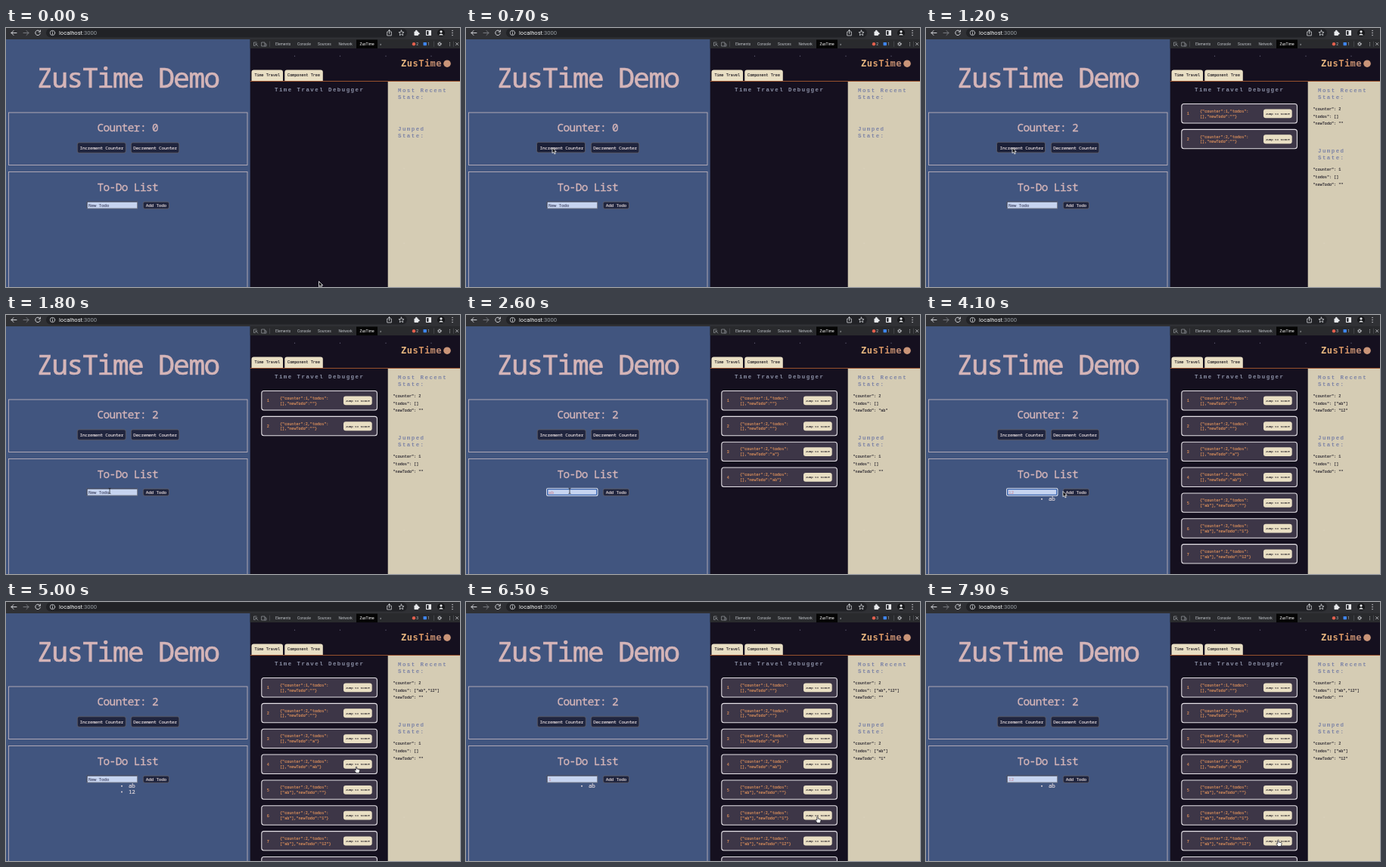
Recreate the animation shown at these times as an HTML page. Size 600x343 px, loop 8 s.

```html
<!DOCTYPE html>
<html lang="en">
<head>
<meta charset="utf-8">
<title>ZusTime Demo</title>
<style>
html, body { margin: 0; width: 100%; height: 100%; overflow: hidden; background: #41557f; }
svg { display: block; width: 100%; height: 100%; }
text { white-space: pre; fill: currentColor; stroke: currentColor; stroke-width: .02em; }
.page { font-family: "Noto Sans Mono", "DejaVu Sans Mono", monospace; letter-spacing: -.04em; color: #d5b5b8; }
.small { font-size: 6.05px; }
.label { color: #e6dcde; }
.ui { font-family: Roboto, Inter, sans-serif; font-size: 4.9px; color: #bdc1c6; stroke: none; }
.code { font-family: "Liberation Mono", "DejaVu Sans Mono", monospace; font-size: 5.12px; }
.head { font-size: 7.4px; font-weight: bold; letter-spacing: 1.48px; color: #7d84a6; stroke: none; }
.light { color: #8b90a6; }
.brand {
  font: bold 12px "DejaVu Sans Mono", monospace; letter-spacing: .5px;
  fill: url(#brand); stroke: none;
}
</style>
</head>
<body>
<svg id="stage" viewBox="0 0 600 343">
  <defs>
    <linearGradient id="brand">
      <stop offset="0" stop-color="#ecbf86"/>
      <stop offset=".5" stop-color="#d3905f"/>
      <stop offset="1" stop-color="#b98a78"/>
    </linearGradient>
  </defs>
</svg>
<script>
const LOOP = 8000;
const stage = document.getElementById("stage");

function add(tag, attrs, parent = stage) {
  const el = document.createElementNS("http://www.w3.org/2000/svg", tag);
  for (const k in attrs) el.setAttribute(k, attrs[k]);
  parent.appendChild(el);
  return el;
}
const rect = (x, y, width, height, fill, more = {}, parent) =>
  add("rect", { x, y, width, height, fill, ...more }, parent);
const dot = (cx, cy, r, fill, parent) => add("circle", { cx, cy, r, fill }, parent);
const line = { fill: "none", stroke: "#d0d2d6", "stroke-width": 1, "stroke-linecap": "round", "stroke-linejoin": "round" };
const icon = (d, more = {}) => add("path", { d, ...line, ...more });
const ringIcon = (cx, cy, r, more) => add("circle", { cx, cy, r, ...line, ...more });
function text(str, x, y, cls, more = {}, parent) {
  const el = add("text", { x, y, class: cls, ...more }, parent);
  el.textContent = str;
  return el;
}
const show = (el, on) => el.setAttribute("display", on ? "inline" : "none");
const middle = { "text-anchor": "middle" };

// Browser toolbar
function drawToolbar() {
  const thin = { "stroke-width": 0.8 };
  rect(0, 0, 600, 15, "#303135");
  rect(53, 0.5, 477, 12, "#212226", { rx: 6 });
  icon("M14 6.5H7M10 3.5L7 6.5L10 9.5");
  icon("M23 6.5H30M27 3.5L30 6.5L27 9.5", { stroke: "#77797e" });
  icon("M44.6 4.2A3.3 3.3 0 1 0 45.3 7.2M45.4 3V5.2H43.2");
  icon("M61.5 6V8.5M61.5 4.4V4.5", thin);
  ringIcon(61.5, 6.5, 3.2, thin);
  text("localhost", 70, 9.3, "ui", { style: "font-size:7.6px;color:#f1f3f4" })
    .insertAdjacentHTML("beforeend", '<tspan color="#9aa0a6">:3000</tspan>');
  icon("M505 5H503.7V10H509.3V5H508M506.5 7.5V2.5M505 4L506.5 2.5L508 4", thin);
  icon("M522.5 3L523.5 5.4L526 5.6L524.1 7.2L524.7 9.8L522.5 8.4L520.3 9.8L520.9 7.2L519 5.6L521.5 5.4Z", thin);
  rect(539.5, 4.5, 5.5, 5.5, "#e8eaed", { rx: 0.8 });
  dot(542.3, 4, 1.3, "#e8eaed");
  dot(545.3, 7.2, 1.3, "#e8eaed");
  rect(555.5, 3.5, 6, 6, "none", { stroke: "#e8eaed" });
  rect(558.5, 3.5, 3, 6, "#e8eaed");
  dot(575, 6.5, 5, "#17181b");
  dot(575, 4.8, 1.6, "#e8eaed");
  add("path", { d: "M572 9.6Q575 5.2 578 9.6Z", fill: "#e8eaed" });
  [3.5, 6.5, 9.5].forEach(y => dot(590, y, 0.75, "#d0d2d6"));
}

// Demo page on the left
function button(x, y, w, h, label) {
  const box = rect(x, y, w, h, "#20253e", { rx: 2.3, stroke: "#62616a", "stroke-width": 0.8 });
  text(label, x + w / 2, y + h / 2 + 2.1, "page small label", middle);
  return { box, x, y, w, h };
}

rect(0, 15, 323, 328, "#41557f");
text("ZusTime Demo", 161, 78.5, "page", { "font-size": 35.9, ...middle });
const frameStyle = { stroke: "#c2b5be", "stroke-width": 0.85 };
rect(3.5, 112, 315.5, 69.5, "none", frameStyle);
rect(3.5, 190.5, 315.5, 160, "none", frameStyle);
const counter = text("", 160.8, 137.3, "page", { "font-size": 14.4, ...middle });
text("To-Do List", 160.8, 216, "page", { "font-size": 14.4, ...middle });
const buttons = [
  button(94.3, 151.8, 64, 13.6, "Increment Counter"),
  button(165.3, 151.8, 63.5, 13.6, "Decrement Counter"),
  button(181.3, 230.2, 34.2, 9.2, "Add Todo")
];
rect(107, 230, 66.6, 9, "#c6d4f0", { stroke: "#777b88", "stroke-width": 0.9 });
add("path", { d: "M107 239V230H173.6", fill: "none", stroke: "#333a52", "stroke-width": 1 });
const ring = add("g", {});
rect(106.7, 229.7, 67.2, 9.6, "none", { rx: 1.2, stroke: "#f2f5ff", "stroke-width": 1.1 }, ring);
rect(107.8, 230.8, 65, 7.4, "none", { rx: 0.6, stroke: "#1c50a8", "stroke-width": 1.1 }, ring);
const field = text("", 109, 236.6, "page small");
const items = [0, 1].map(i => {
  const g = add("g", {});
  dot(153, 243.7 + i * 7.9, 1, "#e3d5d8", g);
  const label = text("", 162, 246.1 + i * 7.9, "page label", { "font-size": 7.6 }, g);
  return { g, label };
});

drawToolbar();

// Developer tools panel
rect(322.7, 15, 277.3, 328, "#15101f");
rect(322.7, 15, 277.3, 12, "#292a2d");
rect(463, 15.5, 28, 11.5, "#050505");
const fine = { "stroke-width": 0.6, stroke: "#a9adb2" };
icon("M331 19H327.5V23.5H329M330 21L333 24M330 23V21H332", fine);
icon("M338 19H342V24H338ZM342 21H344V24H342", fine);
icon("M348.5 18V24.5M565.5 18V24.5M591.5 18V24.5", { stroke: "#55575c", "stroke-width": 0.6 });
[["Elements", 356], ["Console", 385], ["Sources", 412], ["Network", 439.5], ["ZusTime", 467.5], ["»", 494]]
  .forEach(([s, x]) => text(s, x, 22.9, "ui", s === "ZusTime" ? { style: "color:#fff" } : {}));
dot(539, 21.2, 2.2, "#e4604e");
const errors = text("", 542.3, 22.9, "ui");
rect(551.5, 19, 4.4, 4.2, "#3f86f0", { rx: 0.6 });
text("1", 557.3, 22.9, "ui");
ringIcon(573, 21.2, 1.6, { "stroke-width": 0.9 });
ringIcon(573, 21.2, 2.5, { "stroke-dasharray": "1 1", "stroke-linecap": "butt", "stroke-width": 0.7 });
[19.2, 21.2, 23.2].forEach(y => dot(586.5, y, 0.5, "#c4c7cb"));
icon("M594.5 19.5L597.8 22.8M597.8 19.5L594.5 22.8", { "stroke-width": 0.7 });

[381.5, 441.5, 502, 562].forEach(x => dot(x, 37.2, 0.65, "#66627a"));
text("ZusTime", 522, 51, "brand");
dot(583, 47.2, 4.8, "#c99478");

function tab(x, w, label) {
  add("path", { d: `M${x} 70V58.5Q${x} 55.5 ${x + 3} 55.5H${x + w - 3}Q${x + w} 55.5 ${x + w} 58.5V70Z`, fill: "#e9dfc4" });
  text(label, x + w / 2, 64.2, "code", { ...middle, color: "#1c1820" });
}
tab(324.5, 41.5, "Time Travel");
tab(368.3, 50.5, "Component Tree");
rect(504.7, 71, 95.3, 272, "#d5ccb4");
rect(322.7, 70, 277.3, 1, "#97502c");
[186, 285].forEach(y => dot(526, y, 0.6, "#e0d9c6"));
text("Time Travel Debugger", 355, 84.3, "code head light");
text("Most Recent", 518, 84.5, "code head");
text("State:", 518, 94, "code head");
const jumpedHead = add("g", {});
text("Jumped", 518, 135.6, "code head", {}, jumpedHead);
text("State:", 518, 145.2, "code head", {}, jumpedHead);

const readout = y => [0, 1, 2].map(i => text("", 511.5, y + i * 9.8, "code", { color: "#24212a" }));
const recentLines = readout(108.8);
const jumpedLines = readout(189.4);

// Recorded states: time, counter, todos, draft
const log = [
  [800, 1, [], ""],
  [1100, 2, [], ""],
  [2300, 2, [], "a"],
  [2500, 2, [], "ab"],
  [3400, 2, ["ab"], ""],
  [3800, 2, ["ab"], "1"],
  [4000, 2, ["ab"], "12"],
  [4400, 2, ["ab", "12"], ""]
].map(([at, counter, todos, newTodo]) => ({ at, data: { counter, todos, newTodo } }));
const empty = { counter: 0, todos: [], newTodo: "" };
const jumps = [[800, 0], [5200, 3], [6500, 5], [7900, 6]];
const focus = [[1900, 3250], [3700, 4350]];

const cards = log.map(({ data }, i) => {
  const y = 100.5 + i * 33.85;
  const g = add("g", { color: "#e8975e" });
  rect(337.8, y, 152.6, 25.4, "#3d3647", { rx: 3, stroke: "#e6e2e8", "stroke-width": 1.05 }, g);
  text(i + 1, 344.8, y + 14.9, "code", {}, g);
  const json = JSON.stringify(data);
  const cut = json.indexOf("[");
  text(json.slice(0, cut), 362, y + 11.2, "code", {}, g);
  text(json.slice(cut), 362, y + 18.1, "code", {}, g);
  rect(446, y + 7, 37.7, 11.8, "#e9dfc4", { rx: 3 }, g);
  text("Jump to state", 464.8, y + 14.2, "code",
    { ...middle, color: "#1c1820", style: "font-size:4.1px" }, g);
  return g;
});

// Pointer path: time, x, y
const path = [
  [0, 413.5, 335.5], [150, 413.5, 335.5], [650, 114, 158.5], [1200, 114, 158.5],
  [1550, 135, 238], [1750, 137, 233], [2700, 137, 233], [3200, 194, 230.5],
  [3450, 194, 230.5], [3680, 150, 234], [3950, 150, 234], [4100, 181, 233.5],
  [4250, 194, 232], [4450, 194, 232], [4950, 463, 218], [5500, 463, 218],
  [6050, 464.5, 284], [7000, 464.5, 284], [7600, 465.5, 315], [LOOP, 465.5, 315]
];
const edge = { stroke: "#fff", "stroke-width": 0.8, "stroke-linejoin": "round" };
const pointers = {
  arrow: add("path", { d: "M0 0V7.2L1.7 5.7L2.9 8.4L4.2 7.8L3 5.2H5.2Z", fill: "#08080a", ...edge }),
  beam: add("path", { d: "M-1.4 -3.6Q0 -3.6 0 -2.6Q0 -3.6 1.4 -3.6M0 -2.6V2.6M-1.4 3.6Q0 3.6 0 2.6Q0 3.6 1.4 3.6",
    fill: "none", stroke: "#1c1d22", "stroke-width": 0.8 }),
  hand: add("path", { d: "M-.7 .6Q0 -.5 .7 .6V3L4 3.7Q4.7 4 4.5 5.2L3.7 8.6H-.2L-2.7 5Q-2.4 3.8 -.7 5Z",
    fill: "#fff", stroke: "#15131a", "stroke-width": 0.7, "stroke-linejoin": "round" })
};

function pointerAt(t) {
  const i = Math.max(1, path.findIndex(p => p[0] > t));
  const [t0, x0, y0] = path[i - 1], [t1, x1, y1] = path[i];
  const u = (t - t0) / (t1 - t0), e = u * u * (3 - 2 * u);
  return [x0 + (x1 - x0) * e, y0 + (y1 - y0) * e];
}
const inside = (x, y, b) => x > b.x && x < b.x + b.w && y > b.y && y < b.y + b.h;

function fill(lines, data) {
  const rows = data ? Object.entries(data) : [];
  lines.forEach((el, i) => {
    el.textContent = rows[i] ? `"${rows[i][0]}": ${JSON.stringify(rows[i][1])}` : "";
  });
}

function render(t) {
  const done = log.filter(s => s.at <= t);
  const recent = done.length ? done[done.length - 1].data : null;
  const jump = jumps.filter(j => j[0] <= t).pop();
  const jumped = jump ? log[jump[1]].data : null;
  const app = (jump && jump[1] > 0 ? jumped : recent) || empty;

  cards.forEach((g, i) => show(g, i < done.length));
  fill(recentLines, recent);
  fill(jumpedLines, jumped);
  jumpedHead.setAttribute("transform", `translate(0 ${recent ? 29 : 0})`);
  errors.textContent = t < 3500 ? 2 : 3;

  counter.textContent = "Counter: " + app.counter;
  field.textContent = app.newTodo || "New Todo";
  field.style.color = app.newTodo ? "#cb8fa0" : "#464c6b";
  show(ring, focus.some(([a, b]) => t >= a && t < b));
  items.forEach(({ g, label }, i) => {
    show(g, i < app.todos.length);
    label.textContent = app.todos[i] || "";
  });

  const [x, y] = pointerAt(t);
  buttons.forEach(b => {
    const over = inside(x, y, b);
    b.box.setAttribute("fill", over ? "#1b2038" : "#20253e");
    b.box.setAttribute("transform", over ? "translate(-.8 -.5)" : "");
  });
  const kind = inside(x, y, { x: 107, y: 230, w: 66, h: 9 }) ? "beam"
    : inside(x, y, { x: 446, y: 100, w: 38, h: 230 }) && done.length ? "hand" : "arrow";
  for (const k in pointers) {
    show(pointers[k], k === kind);
    pointers[k].setAttribute("transform", `translate(${x} ${y})`);
  }
}

const start = performance.now();
function tick(now) {
  render(Math.max(0, now - start) % LOOP);
  requestAnimationFrame(tick);
}
render(0);
requestAnimationFrame(tick);
</script>
</body>
</html>
```
